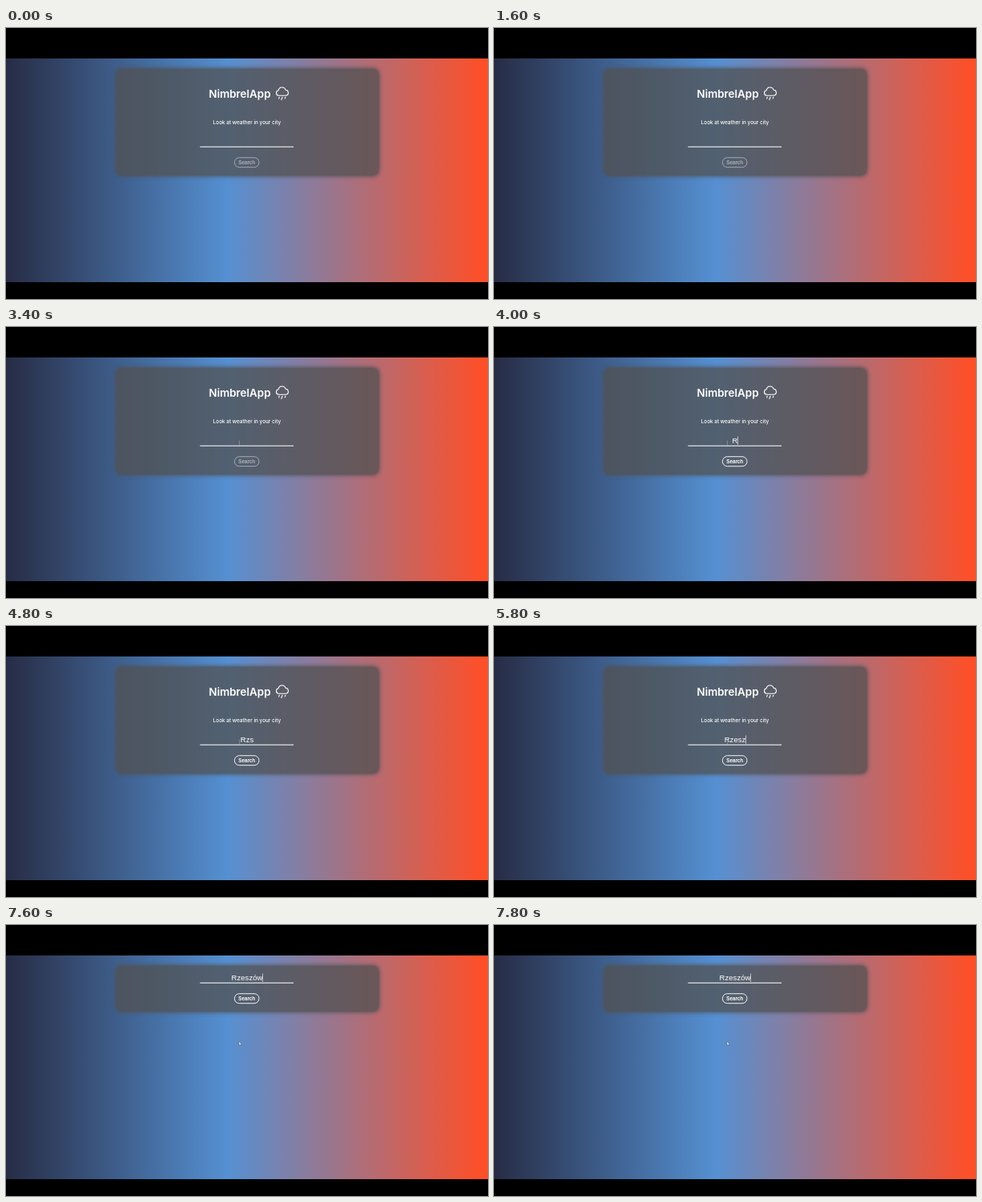
These frames come from a looping animation (600 px wide and 338 px high, 8 s). An HTML page:

```html
<!DOCTYPE html>
<html lang="en">
<head>
<meta charset="utf-8">
<title>Weather search</title>
<style>
  html, body { margin: 0; width: 100%; height: 100%; overflow: hidden; background: #000; }
  #page {
    position: absolute; left: 0; top: 38px; width: 600px; height: 279px; overflow: hidden;
    background: linear-gradient(90deg, #272c45, #5590d2 46%, #ff4f28 99%);
  }
  #card {
    position: absolute; left: 136.5px; top: 13px; width: 327px; height: 133px;
    border-radius: 7px; background: rgba(80, 80, 80, .75);
    box-shadow: 0 0 5px 1px #505358;
  }
  svg { position: absolute; left: 0; top: 0; }
  text { fill: #fff; }
  .ui { font-family: Inter, sans-serif; }
  .form { font-family: "Liberation Sans", Arial, sans-serif; }
</style>
</head>
<body>
<div id="page"><div id="card"></div></div>
<svg width="600" height="338" viewBox="0 0 600 338">
  <g id="head" class="ui">
    <text x="252.5" y="87.4" font-size="13.4" font-weight="600">NimbrelApp</text>
    <text x="300" y="120" font-size="6.4" font-weight="500" text-anchor="middle">Look at weather in your city</text>
    <g fill="none" stroke="#fff" stroke-width="1.1" stroke-linecap="round">
      <path d="M339.3 84.3a3.3 3.3 0 0 1-.2-6.5a4.6 4.6 0 0 1 8.9-.6a3.6 3.6 0 0 1 .6 7.1z"/>
      <path d="M340.3 86.2l-.7 1.8M344 86.2l-1.2 3.3M347.8 86.2l-.7 1.8"/>
    </g>
  </g>
  <g id="form" class="form">
    <text id="city" x="300" y="144.9" font-size="9.6" text-anchor="middle"></text>
    <rect id="caret" y="136.5" width=".7" height="10.5" fill="#fff" opacity=".85"/>
    <rect x="241.5" y="147.7" width="116.5" height="1" fill="#fff"/>
    <g id="button">
      <rect x="284.4" y="161.7" width="30.6" height="12" rx="6" fill="none" stroke="#fff" stroke-width=".9"/>
      <text x="299.7" y="169.8" font-size="6.3" font-weight="bold" text-anchor="middle">Search</text>
    </g>
  </g>
  <path id="beam" d="M290.5 141.5v6.5" stroke="#c4c8cc" stroke-width=".6" opacity=".65"/>
  <path id="arrow" d="M290 145.5v4.6l1.1-.9.8 1.5.7-.4-.7-1.4h1.4z" fill="#fff" stroke="#333" stroke-width=".4"/>
</svg>
<script>
  const $ = id => document.getElementById(id);
  const LOOP = 8000, ENABLED = 4000, COLLAPSE = 7600;
  const typed = [[0, ''], [4000, 'R'], [4200, 'Rz'], [4400, 'Rzs'], [5000, 'Rz'],
    [5600, 'Rzes'], [5800, 'Rzesz'], [6200, 'Rzeszó'], [6400, 'Rzeszów']];
  const caretOn = [[1800, 2200], [2800, 3200], [3800, 4800], [5000, 5400], [5600, 7000], [7600, 8000]];

  const show = (id, on) => $(id).style.display = on ? '' : 'none';

  function draw(t) {
    const small = t >= COLLAPSE;
    const city = typed.filter(([at]) => t >= at).pop()[1];
    if ($('city').textContent !== city) $('city').textContent = city;

    const half = city ? $('city').getComputedTextLength() / 2 : 0;
    $('caret').setAttribute('x', 299.7 + half);
    show('caret', caretOn.some(([from, to]) => t >= from && t < to));

    $('button').setAttribute('opacity', t < ENABLED ? .5 : 1);
    $('card').style.height = (small ? 57 : 133) + 'px';
    $('form').setAttribute('transform', `translate(0 ${small ? -76 : 0})`);
    show('head', !small);
    show('beam', t >= 3200 && !small);
    show('arrow', small);
  }

  const start = performance.now();
  function tick() {
    draw((performance.now() - start) % LOOP);
    requestAnimationFrame(tick);
  }
  tick();
</script>
</body>
</html>
```
